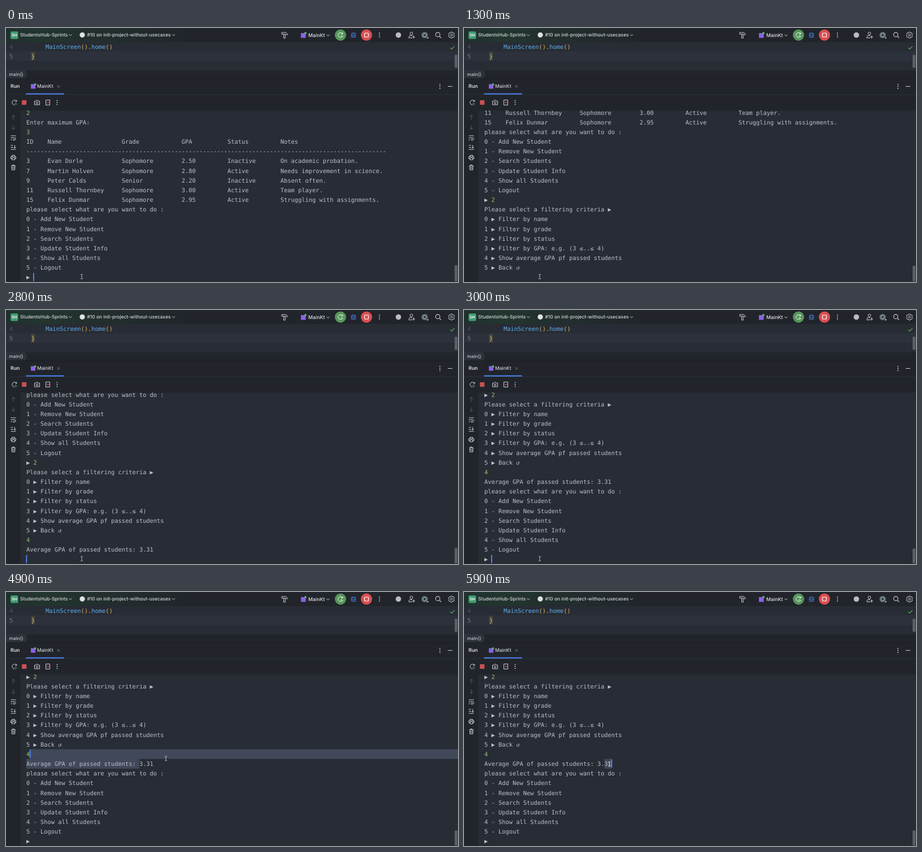
Write an HTML page with a canvas that moves like this. It is 800 px wide and 450 px high and loops after 6000 ms.

```html
<!DOCTYPE html>
<html lang="en">
<head>
<meta charset="utf-8">
<title>Student console</title>
<style>
  html, body { margin: 0; width: 100%; height: 100%; overflow: hidden; background: #282c34; }
  canvas { display: block; }
</style>
</head>
<body>
<canvas id="stage" width="800" height="450"></canvas>
<script>
const ctx = document.getElementById('stage').getContext('2d');
const LOOP = 6000, TICK = 100, BLINK = 520;
const LEFT = 36, CELL = 6.25, TOP = 149.8, PITCH = 17.17, ROWS = 18;
const MONO = '10.38px "DejaVu Sans Mono", monospace';
const ui = (size, weight = 500) => `${weight} ${size}px Inter, sans-serif`;
const INK = '#bcc0c8', ICON = '#ced0d6', DIM = '#565c66', GREEN = '#98c379',
      BLUE = '#61afef', GOLD = '#e0b35c', RED = '#db5c5c';

// Console content; text after "|" is typed by the user.
const columns = [6, 21, 17, 13, 15, 0];
const tableRow = (...cells) => cells.map((cell, i) => cell.padEnd(columns[i])).join('');
const menu = ['please select what are you want to do :', '0 - Add New Student',
  '1 - Remove New Student', '2 - Search Students', '3 - Update Student Info',
  '4 - Show all Students', '5 - Logout'];
const filters = ['Please select a filtering criteria ▶', '0 ▶ Filter by name',
  '1 ▶ Filter by grade', '2 ▶ Filter by status', '3 ▶ Filter by GPA: e.g. (3 ≤..≤ 4)',
  '4 ▶ Show average GPA pf passed students', '5 ▶ Back ↺'];
const firstScreen = ['|2', 'Enter maximum GPA:', '|3',
  tableRow('ID', 'Name', 'Grade', 'GPA', 'Status', 'Notes'),
  '-'.repeat(102),
  tableRow('3', 'Evan Dorle', 'Sophomore', '2.50', 'Inactive', 'On academic probation.'),
  tableRow('7', 'Martin Holven', 'Sophomore', '2.80', 'Active', 'Needs improvement in science.'),
  tableRow('9', 'Peter Calds', 'Senior', '2.20', 'Inactive', 'Absent often.'),
  tableRow('11', 'Russell Thornbey', 'Sophomore', '3.00', 'Active', 'Team player.'),
  tableRow('15', 'Felix Dunmar', 'Sophomore', '2.95', 'Active', 'Struggling with assignments.'),
  ...menu, '▶ '];

// Each step replaces the last console line.
const steps = [
  [0, firstScreen],
  [300, ['▶ |2']],
  [600, ['▶ |2', ...filters, '']],
  [2500, ['|4']],
  [2800, ['|4', 'Average GPA of passed students: 3.31', '']],
  [2900, [...menu, '▶ ']],
];

const pointerPath = [[0, 134, 440.5], [3600, 134, 440.5], [4300, 239, 305], [4500, 239, 305],
  [4700, 268, 304], [4900, 283, 295], [5100, 283, 295], [5600, 257, 305], [LOOP, 257, 305]];

function pointerAt(t) {
  const i = pointerPath.findIndex(p => p[0] > t);
  const [t0, x0, y0] = pointerPath[i - 1], [t1, x1, y1] = pointerPath[i];
  const k = (t - t0) / (t1 - t0), e = k * k * (3 - 2 * k);
  return { x: x0 + (x1 - x0) * e, y: y0 + (y1 - y0) * e };
}

const plain = line => line.replace('|', '');
const colX = col => LEFT + col * CELL;
const rowY = row => TOP + row * PITCH;

function rect(x, y, w, h, color, radius = 0) {
  ctx.fillStyle = color;
  ctx.beginPath();
  ctx.roundRect(x, y, w, h, radius);
  ctx.fill();
}
function dot(x, y, r, color) { rect(x - r, y - r, 2 * r, 2 * r, color, r); }
function text(string, x, y, color, font) {
  ctx.font = font;
  ctx.fillStyle = color;
  ctx.fillText(string, x, y);
}
function icon(x, y, path, color = ICON, width = 1, fill) {
  const shape = new Path2D(path);
  ctx.save();
  ctx.translate(x, y);
  ctx.lineWidth = width;
  ctx.strokeStyle = color;
  if (fill) { ctx.fillStyle = fill; ctx.fill(shape); }
  ctx.stroke(shape);
  ctx.restore();
}
const ring = (r, x = 0, y = 0) => `M${x + r} ${y}a${r} ${r} 0 1 1 ${-2 * r} 0a${r} ${r} 0 1 1 ${2 * r} 0`;
const chevron = (x, y) => icon(x, y, 'M-2.6-1.3L0 1.3 2.6-1.3');
const kebab = (x, y) => [-3.5, 0, 3.5].forEach(dy => dot(x, y + dy, 0.9, ICON));
function rerun(x, y, color, play) {
  icon(x, y, 'M3.6-2.2A4.2 4.2 0 1 0 0 4.2M3.9-4.4V-1.9H1.4', color);
  icon(x, y, 'M1.2 .6L4.6 2.6 1.2 4.6Z', play, 0.7);
}

function drawTopBar() {
  const tint = ctx.createLinearGradient(0, 0, 320, 0);
  tint.addColorStop(0, '#20302f');
  tint.addColorStop(0.2, '#23352f');
  tint.addColorStop(1, '#21252b');
  rect(0, 0, 800, 25, tint);
  rect(8, 6, 13.5, 13.5, '#3f9c70', 2.5);
  text('SH', 10, 15.4, '#fff', ui(7, 600));
  text('StudentsHub-Sprints', 25, 15.3, '#d5d8dd', ui(8.4));
  chevron(114, 12.5);
  dot(135, 12.3, 4.6, '#dfe1e5');
  text('#10 on init-project-without-usecases', 143.5, 15.3, '#d5d8dd', ui(8.4));
  chevron(296.5, 12.5);

  icon(493, 12.5, 'M-5-4.5H2L5-2V-.5H2.5L1.5-1.5H-5ZM-1.5-1.5V5.5H1.2V-1.5');
  rect(522, 9, 8.5, 8.5, '#8b62e8');
  dot(530, 9, 2, '#5fad65');
  text('MainKt', 535, 16, '#dfe1e5', ui(8.8));
  chevron(570, 13);
  dot(592, 12.5, 10, '#57965c');
  rerun(592, 12.5, '#fff', '#fff');
  icon(615, 13, 'M-2.5-1.5a2.5 2.5 0 0 1 5 0v3a2.5 2.5 0 0 1-5 0ZM-2.5 0H-5M2.5 0H5M-2.5-2L-4.5-3.5M2.5-2L4.5-3.5M-2.5 2L-4.5 4M2.5 2L4.5 4M-1.5-4L-2.5-5M1.5-4L2.5-5M0-1V2', '#548af7');
  dot(638, 12.5, 10, '#d94f52');
  icon(638, 12.5, 'M-3.5-2.5a1 1 0 0 1 1-1h5a1 1 0 0 1 1 1v5a1 1 0 0 1-1 1h-5a1 1 0 0 1-1-1Z', '#fff', 1.2);
  kebab(661, 12.5);

  dot(694.5, 12.5, 4.8, '#b9bcc3');
  icon(718, 12.5, ring(2.4, -0.5, -2.8) + 'M-5 5V4a3 3 0 0 1 3-3H1M-5 5H1M3.5 1V6M1 3.5H6');
  dot(741, 12.5, 5.6, '#687078');
  dot(741, 12.5, 2.6, '#1d3335');
  icon(741, 12.5, ring(2.6), '#a9d6cc', 0.8);
  icon(746, 17, 'M-1 1L1 1 1-1Z', ICON, 0.8, ICON);
  icon(765, 12.5, ring(3.8, -0.8, -0.8) + 'M2 2L5.2 5.2', ICON, 1.1);
  icon(788.5, 12.5, 'M-1.3-5.3H1.3L1.9-3.6 4-4 5.3-1.7 4 0 5.3 1.7 4 4 1.9 3.6 1.3 5.3H-1.3L-1.9 3.6-4 4-5.3 1.7-4 0-5.3-1.7-4-4-1.9-3.6Z' + ring(1.8));
}

function drawEditor() {
  rect(0, 25, 800, 50, '#282c34');
  rect(0, 41.5, 800, 17, '#2c313b');
  text('4', 6, 36.8, '#4b5263', MONO);
  text('5', 6, 54, '#737a87', MONO);
  let x = 70;
  for (const [part, color] of [['MainScreen', BLUE], ['()', GOLD], ['.', INK], ['home', BLUE], ['()', GOLD]]) {
    text(part, x, 36.8, color, MONO);
    x += part.length * CELL;
  }
  rect(44.5, 42.5, 6.5, 15, '#44483f');
  text('}', 44.7, 54, '#e5c07b', MONO);
  icon(790, 35, 'M-3.5 0L-1 2.5 3.8-2.8', '#5fad65', 1.2);
  rect(794, 47.5, 5, 23, '#5b5f67', 1);

  rect(0, 75, 800, 15, '#21252b');
  icon(0, 75, 'M0 .5H33.5L37 7.5 33.5 14.5H0', '#343942', 0.8, '#2c313a');
  text('main()', 5.5, 85.3, '#c3c7ce', ui(8.2));
}

function drawToolWindow() {
  rect(0, 89.5, 800, 57, '#21252b');
  rect(0, 89.5, 800, 1, '#1b1e23');
  rect(0, 117.5, 800, 1, '#2d323a');
  text('Run', 8, 106.3, '#dfe1e5', ui(8.7, 600));
  rect(35, 115.8, 68, 2, '#4d83f3', 1);
  rect(44, 99.5, 8, 8, '#8b62e8');
  dot(51.5, 100, 2, '#5fad65');
  text('MainKt', 55, 106.3, '#ced0d6', ui(8.5));
  icon(93, 103.5, 'M-2-2L2 2M2-2L-2 2', '#8c929c', 0.8);
  kebab(768, 103.5);
  icon(786, 103.5, 'M-4 0H4');

  rerun(15, 132, ICON, '#5fad65');
  rect(28.5, 128.2, 7.5, 7.5, '#c94f4f', 1);
  icon(32.2, 132, 'M-3.5-3.5H3.5V3.5H-3.5Z', RED, 0.8);
  icon(55, 132, 'M-4.5-2.5H-2.3L-1.3-4H1.3L2.3-2.5H4.5V4H-4.5Z' + ring(1.7, 0, 0.6));
  icon(74, 132, 'M-3.5-4.5H3.5V4.5H-3.5Z');
  icon(74, 132, 'M-1.8 0H1.8M0-1.8L1.8 0 0 1.8', RED);
  kebab(90.5, 132);

  rect(0, 146, 25.5, 304, '#21252b');
  icon(13, 158.5, 'M0 4V-4M-3-1L0-4 3-1', DIM);
  icon(13, 176, 'M0-4V4M-3 1L0 4 3 1', DIM);
  icon(13, 194.5, 'M-4.5-3.5H4.5M-4.5 0H2.5a1.8 1.8 0 0 1 0 3.6H0M1.6 1.8L-.2 3.6 1.6 5.2M-4.5 3.5H-2');
  icon(13, 211.5, 'M-4.5-3.5H-.5M-4.5 0H-.5M-4.5 3.5H4.5M2.5-4V1.5M.5-.5L2.5 1.5 4.5-.5');
  icon(13, 229.5, 'M-2.5-1.5V-4H2.5V-1.5M-2.5 2H-4.5V-1.5H4.5V2H2.5M-2.5 .5H2.5V4H-2.5Z');
  icon(13, 247, 'M-4-2.8H4M-1.3-2.8V-4.4H1.3V-2.8M-3-2.8L-2.6 4.4H2.6L3-2.8M-1-.8V2.6M1-.8V2.6');
}

// Text caret and selection anchor once the mouse is in use.
function selectionAt(t, rows) {
  if (t >= 5800) return { at: 5700, anchor: { row: 9, col: 34 }, head: { row: 9, col: 36 } };
  if (t >= 5700) return { at: 5700, anchor: { row: 9, col: 35 }, head: { row: 9, col: 35 } };
  const { x, y } = pointerAt(Math.min(t, 4900));
  const row = Math.round((y - TOP) / PITCH);
  const col = Math.min(Math.round((x - LEFT) / CELL), plain(rows[row]).length);
  return { at: Math.min(t, 4900), anchor: { row: 9, col: 32 }, head: { row, col } };
}

function drawSelection({ anchor, head }) {
  const [from, to] = [anchor, head].sort((a, b) => a.row - b.row || a.col - b.col);
  for (let row = from.row; row <= to.row; row++) {
    const x0 = colX(row === from.row ? from.col : 0);
    const x1 = row === to.row ? colX(to.col) : 800;
    rect(x0, rowY(row) - PITCH / 2, x1 - x0, PITCH, '#414859');
  }
}

function drawConsole(t) {
  const lines = [];
  let at = 0;
  for (const [time, added] of steps) {
    if (time > t) break;
    lines.splice(-1, 1, ...added);
    at = time;
  }
  const rows = lines.slice(-ROWS);
  let caret = { row: ROWS - 1, col: plain(rows[ROWS - 1]).length };

  ctx.save();
  ctx.beginPath();
  ctx.rect(25.5, 146, 775, 304);
  ctx.clip();
  if (t >= 4500) {
    const selection = selectionAt(t, rows);
    drawSelection(selection);
    caret = selection.head;
    at = selection.at;
  }
  rows.forEach((line, row) => {
    const [output, typed = ''] = line.split('|');
    const y = rowY(row) + 3.8;
    text(output, LEFT, y, INK, MONO);
    text(typed, colX(output.length), y, GREEN, MONO);
  });
  if (Math.floor((t - at) / BLINK) % 2 === 0) {
    rect(colX(caret.col) - 0.5, rowY(caret.row) - 7.8, 1.8, 14.6, '#528bff');
  }
  const thumb = 420.3 + (lines.length - ROWS) * 0.13;
  rect(794, thumb, 5, 449 - thumb, '#5b5f67', 1);
  ctx.restore();
}

function drawPointer(t) {
  const { x, y } = pointerAt(t);
  icon(x, y, 'M-2-4Q0-4 0-3Q0-4 2-4M0-3V3M-2 4Q0 4 0 3Q0 4 2 4', '#c9ccd2', 0.9);
}

function frame() {
  const t = Math.floor(performance.now() % LOOP / TICK) * TICK;
  ctx.textRendering = 'geometricPrecision';
  rect(0, 0, 800, 450, '#282c34');
  drawTopBar();
  drawEditor();
  drawToolWindow();
  drawConsole(t);
  drawPointer(t);
  requestAnimationFrame(frame);
}
frame();
</script>
</body>
</html>
```
